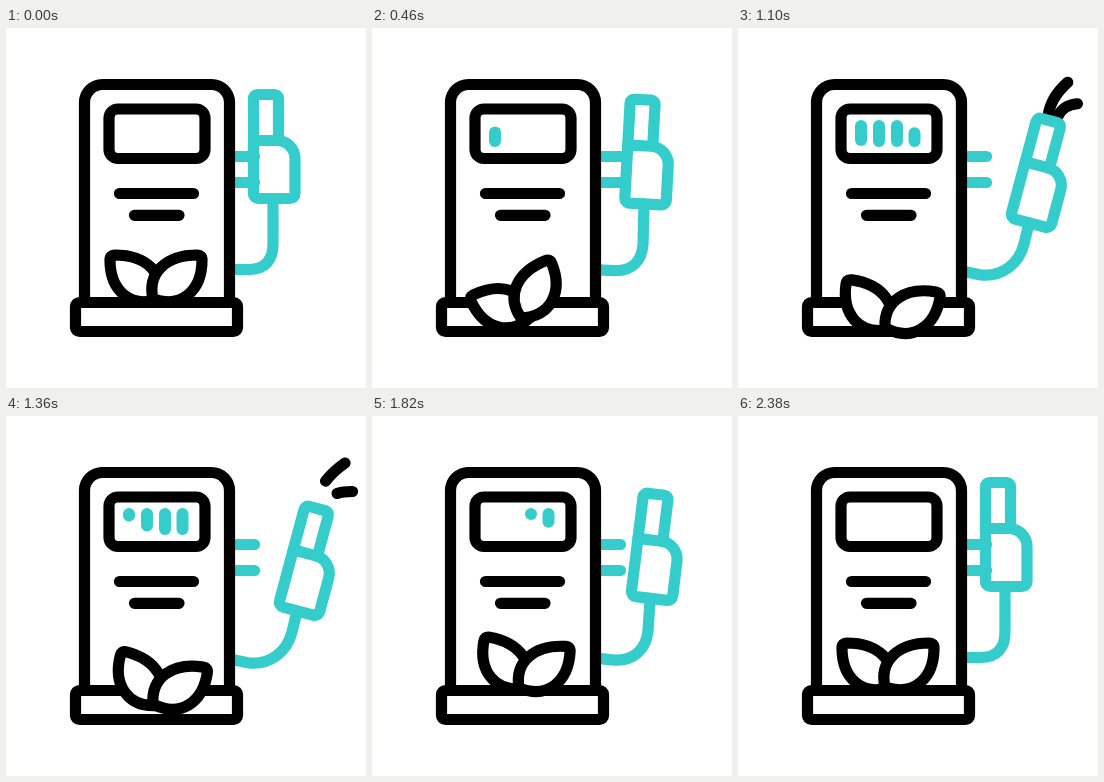
Recreate the animation shown at these times as an HTML page. Size 360 by 360 pixels, loop 2.4 s.

```html
<!DOCTYPE html>
<html lang="en">
<head>
<meta charset="utf-8">
<title>Eco fuel pump</title>
<style>
  html, body { margin: 0; width: 100%; height: 100%; overflow: hidden; background: #fff; }
  svg { display: block; width: 100vw; height: 100vh; }
  path, rect { fill: none; stroke: #000; stroke-width: 11.2; stroke-linecap: round; stroke-linejoin: round; }
  .teal, .teal * { stroke: #34cdcc; }
  .bar { stroke-width: 12; }
  .leaf { fill: #fff; }
</style>
</head>
<body>
<svg viewBox="0 0 360 360">
  <path class="teal" d="M226 128.5H248.500M226 154.500H248.500"/>
  <path class="teal" id="hose"/>
  <path class="spray" pathLength="1" d="M310 90C311 76 318 62 339 47"/>
  <path class="spray" pathLength="1" d="M320 88C325 78 332 75.500 346.500 75.500"/>
  <g class="teal" id="nozzle">
    <path d="M247.500 112.500V70.500a4 4 0 0 1 4-4h17a4 4 0 0 1 4 4V112.500"/>
    <path d="M247.500 112.500H271a18 18 0 0 1 18 18V165.500a5 5 0 0 1-5 5H252.500a5 5 0 0 1-5-5Z"/>
  </g>
  <path d="M78.500 272V74.500a18 18 0 0 1 18-18H205.500a18 18 0 0 1 18 18V272"/>
  <rect x="103" y="81" width="96" height="49.500" rx="9"/>
  <g class="teal" id="bars"></g>
  <path d="M113.500 165.500H187.500M128.500 187.300H173"/>
  <rect x="69.500" y="274.500" width="162" height="29" rx="4"/>
  <g id="left"><path class="leaf" transform="translate(300) scale(-1 1)"/></g>
  <g id="right"><path class="leaf"/></g>
</svg>
<script>
const LOOP = 2400;
const $ = id => document.getElementById(id);
const clamp = v => Math.min(1, Math.max(0, v));
const ramp = (t, start, length) => clamp((t - start) / length);
const ease = u => u * u * (3 - 2 * u);
const mix = (a, b, u) => a + (b - a) * u;

const LEAF = 'M147 271C141 245 160 227 191 227Q196 227 196 232C196 262 176 281 147 271Z';
document.querySelectorAll('.leaf').forEach(el => el.setAttribute('d', LEAF));

const bars = [123, 141, 159, 176.5].map(x => {
  const el = document.createElementNS('http://www.w3.org/2000/svg', 'path');
  el.setAttribute('class', 'bar');
  $('bars').append(el);
  return { el, x };
});
const sprays = document.querySelectorAll('.spray');

// time, then x, y, angle of the left leaf and of the right leaf
const leafKeys = [
  [0, 0, 0, 0, 0, 0, 0],
  [180, 0, 0, 0, 0, 0, 0],
  [460, 7, 17, -25, 2, 19, -22],
  [560, 2, 36, -8, 2, 36, -6],
  [760, -2, -16, 25, -2, -17, 9],
  [1120, -2, 31, 8, 0, 29, 10],
  [1640, 0, 3, 23, 0, 2, 7],
  [1980, 0, 0, 0, 0, 0, 0],
  [LOOP, 0, 0, 0, 0, 0, 0]
];

// hose points hung up and pulled out
const hoseRest = [267, 216, 267, 232, 259, 241.5, 243, 241.5, 226, 241.5];
const hoseOut = [286, 216, 281, 236, 264, 249, 243, 247, 226, 243.5];

function drawNozzle(t) {
  const p = ease(ramp(t, 270, 645)) - ease(ramp(t, 1485, 645));
  const angle = 15 * p, dx = 37.5 * p, dy = 26.5 * p;
  $('nozzle').setAttribute('transform',
    `translate(${dx} ${dy}) rotate(${angle} 268.5 118.5)`);

  const a = angle * Math.PI / 180;
  const x = 268.5 + dx - 1.5 * Math.cos(a) - 52 * Math.sin(a);
  const y = 118.5 + dy - 1.5 * Math.sin(a) + 52 * Math.cos(a);
  const h = hoseRest.map((v, i) => mix(v, hoseOut[i], p));
  $('hose').setAttribute('d',
    `M${x} ${y}L${h[0]} ${h[1]}C${h.slice(2, 8).join(' ')}L${h[8]} ${h[9]}`);
}

function drawBars(t) {
  bars.forEach(({ el, x }, i) => {
    const grow = ramp(t, 340 + 217 * i, 212);
    const drain = ease(ramp(t, 1035 + 195 * i, 410));
    const on = grow > 0 && drain < 1;
    el.setAttribute('d', on ? `M${x} ${mix(113, 98, grow)}V${mix(113, 98, drain)}` : '');
  });
}

function drawSpray(t) {
  const head = ramp(t, 925, 225), tail = ramp(t, 1250, 220);
  sprays.forEach(el => {
    el.style.visibility = head - tail > 0.01 ? 'visible' : 'hidden';
    el.style.strokeDasharray = `${head - tail} 2`;
    el.style.strokeDashoffset = -tail;
  });
}

function drawLeaves(t) {
  const n = leafKeys.findIndex(k => k[0] > t);
  const from = leafKeys[n - 1], to = leafKeys[n];
  const u = ease(ramp(t, from[0], to[0] - from[0]));
  const [, lx, ly, la, rx, ry, ra] = from.map((v, i) => mix(v, to[i], u));
  $('left').setAttribute('transform', `translate(${lx} ${ly}) rotate(${la} 153 271)`);
  $('right').setAttribute('transform', `translate(${rx} ${ry}) rotate(${ra} 147 271)`);
}

const begin = performance.now();
function draw(now) {
  const t = Math.max(0, now - begin) % LOOP;
  drawNozzle(t);
  drawBars(t);
  drawSpray(t);
  drawLeaves(t);
  requestAnimationFrame(draw);
}
draw(begin);
</script>
</body>
</html>
```
